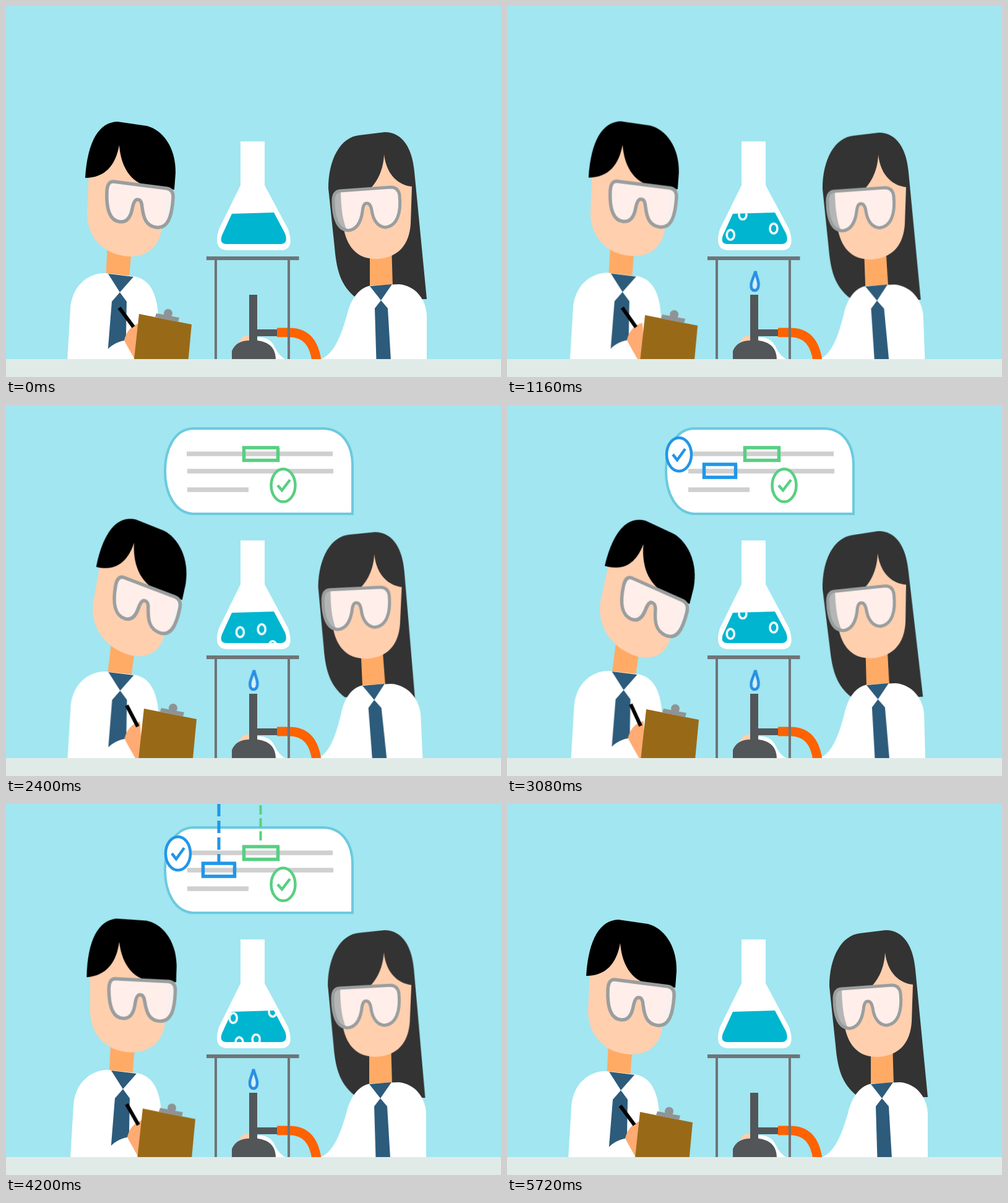
An HTML page without scripts for the animation above (5760 ms loop, 800 by 600 pixels).

```html
<!DOCTYPE html>
<html lang="en">
<head>
<meta charset="utf-8">
<title>Lab experiment</title>
<style>
html, body { margin: 0; width: 100%; height: 100%; overflow: hidden; background: #a1e6f0; }
svg { display: block; width: 800px; height: 600px; }

.loop { animation: 5.76s ease-in-out infinite; }

/* Man */
.m-head { transform-origin: 244px 225px; animation-name: m-head; }
@keyframes m-head {
  0%, 99.31%, 100% { transform: none; }
  11.11% { transform: translate(9.3px, 0) rotate(.6deg); }
  28.47% { transform: translate(1.3px, -1px) rotate(-.6deg); }
  41.67% { transform: translate(32px, -2px) rotate(10.4deg); }
  53.47% { transform: translate(50px, 0) rotate(13deg); }
  72.92% { transform: translate(0, -2px) rotate(-3.3deg); }
}
.m-neck { transform-origin: 240px 434px; animation-name: m-neck; }
@keyframes m-neck {
  0%, 99.31%, 100% { transform: none; }
  11.11% { transform: translate(4.7px, 0) rotate(1.5deg); }
  28.47% { transform: translate(2.7px, 0); }
  41.67% { transform: translate(4px, 0) rotate(5deg); }
  53.47% { transform: translate(11px, 0) rotate(6deg); }
  72.92% { transform: translate(7px, 0); }
}
.m-body { animation-name: m-body; }
@keyframes m-body {
  0%, 99.31%, 100% { transform: none; }
  11.11% { transform: translate(3.5px, 0); }
  28.47% { transform: translate(2px, -1px); }
  41.67% { transform: translate(.5px, -1px); }
  53.47% { transform: translate(4.5px, -2px); }
  72.92% { transform: translate(5px, -2px); }
}
.pen { transform-origin: 206px 519px; animation-name: pen; }
@keyframes pen {
  0%, 99.31%, 100% { transform: none; }
  11.11% { transform: translate(3px, 2px) rotate(2deg); }
  28.47% { transform: translate(2px, -1px) rotate(1deg); }
  41.67% { transform: translate(7px, 1px) rotate(9deg); }
  53.47% { transform: translate(10px, 0) rotate(12deg); }
  72.92% { transform: translate(8px, 0) rotate(7deg); }
}
.board { animation-name: board; }
@keyframes board {
  0%, 99.31%, 100% { transform: none; }
  11.11% { transform: translate(7px, 4px); }
  28.47% { transform: translate(9px, 0); }
  41.67% { transform: translate(8px, -7px); }
  53.47% { transform: translate(10px, -6px); }
  72.92% { transform: translate(6px, -5.5px); }
}

/* Woman */
.w-head { transform-origin: 816px 240px; animation-name: w-head; }
@keyframes w-head {
  0%, 99.31%, 100% { transform: none; }
  11.11% { transform: translate(-9px, 0) rotate(-.8deg); }
  28.47% { transform: translate(-19.5px, 1.5px) rotate(.9deg); }
  41.67% { transform: translate(-21px, 1.5px) rotate(1deg); }
  53.47% { transform: translate(-16px, 0) rotate(-1.4deg); }
  72.92% { transform: translate(-.5px, 0) rotate(.7deg); }
}
.w-body { transform-origin: 853px 571px; animation-name: w-body; }
@keyframes w-body {
  0%, 99.31%, 100% { transform: none; }
  11.11% { transform: translate(-2.7px, 0) skewX(1.2deg); }
  28.47% { transform: translate(-9.3px, 1px) skewX(4deg); }
  41.67% { transform: translate(-8.7px, 1px) skewX(3.5deg); }
  53.47% { transform: translate(-5.3px, 0) skewX(2deg); }
  72.92% { transform: translate(-1.3px, 0); }
}

/* Flame and bubbles */
.flame { transform-origin: 400px 463px; animation-name: flame; }
@keyframes flame {
  0%, 5.5%, 97%, 100% { transform: scale(0); }
  9%, 94.5% { transform: none; }
}
.flick { transform-origin: 400px 463px; animation: flick .48s linear infinite; }
@keyframes flick {
  0%, 100% { transform: skewX(-1.5deg); }
  33%, 75% { transform: none; }
  45% { transform: skewX(-3.5deg); }
}
.gate { animation: 5.76s step-end infinite; }
.g1 { animation-name: gate1; }
.g2 { animation-name: gate2; }
.g3 { animation-name: gate3; }
@keyframes gate1 { 0%, 95.5% { opacity: 0; } 10% { opacity: 1; } }
@keyframes gate2 { 0%, 95.5% { opacity: 0; } 13% { opacity: 1; } }
@keyframes gate3 { 0%, 95.5% { opacity: 0; } 16% { opacity: 1; } }
.rise { animation: rise .48s linear infinite; fill: none; stroke: #fff; stroke-width: 3.5; }
@keyframes rise {
  0%, 85% { opacity: 1; }
  85.1%, 100% { opacity: 0; }
  100% { transform: translate(var(--dx, 0px), -72px); }
}

/* Speech */
.speech { transform-origin: 561px 178px; animation-name: speech; animation-timing-function: linear; }
@keyframes speech {
  0%, 23.6%, 98.1%, 100% { transform: scale(0); }
  30.6%, 91.15% { transform: none; }
}
.draw { stroke-dasharray: 1 1.2; stroke-width: 5.5; animation-timing-function: linear; }
.green { fill: none; stroke: #58cf82; }
.blue { fill: none; stroke: #2196e8; }
.green.draw { animation-name: draw-g; }
.blue.draw { animation-name: draw-b; }
@keyframes draw-g {
  0%, 35.5%, 90%, 100% { stroke-dashoffset: 1.1; }
  41.7%, 85% { stroke-dashoffset: 0; }
}
@keyframes draw-b {
  0%, 45%, 90%, 100% { stroke-dashoffset: 1.1; }
  51%, 85% { stroke-dashoffset: 0; }
}
.pop-g { transform-origin: 448px 130px; animation-name: pop-g; }
.pop-b { transform-origin: 278px 80px; animation-name: pop-b; }
@keyframes pop-g {
  0%, 35%, 90%, 100% { transform: scale(0); }
  40%, 86% { transform: none; }
}
@keyframes pop-b {
  0%, 46%, 90%, 100% { transform: scale(0); }
  51%, 86% { transform: none; }
}
.reveal { transform-origin: 0 95px; animation-name: reveal; }
@keyframes reveal {
  0%, 55%, 83%, 100% { transform: scaleY(0); }
  62%, 78.5% { transform: none; }
}
</style>
</head>
<body>
<svg viewBox="0 0 800 600">
  <defs>
    <clipPath id="fluid"><path d="M365 336L433 334L451 368Q457 385 443 385H357Q344 385 349 371Z"/></clipPath>
    <clipPath id="wire"><rect class="loop reveal" width="800" height="95"/></clipPath>
    <path id="w-lens" d="M540 299L622 293Q634 293 636 306C639 335 632 356 613 358C600 357 593 345 591 330Q589 319 583 319Q577 319 576 333C573 352 566 362 553 363C535 362 529 340 529 315Q529 300 540 299Z"/>
  </defs>
  <rect width="800" height="600" fill="#a1e6f0"/>

  <!-- Speech box -->
  <g class="loop speech">
    <path d="M302 38H513C545 39 560 66 560 97V176H302C272 174 257 142 257 107C257 72 272 39 302 38Z" fill="#fff" stroke="#6ccade" stroke-width="4"/>
    <path d="M292 79H528M293 107H529M293 137H392" stroke="#cfcfcf" stroke-width="7.5"/>
  </g>
  <path class="loop draw green" pathLength="1" d="M439.5 69V89.500H384.500V69H442"/>
  <path class="loop draw blue" pathLength="1" d="M369.500 96V117H318.500V96H372"/>
  <g class="loop pop-g green" stroke-width="4.5">
    <ellipse cx="448" cy="130" rx="19.5" ry="26.5" fill="#fff"/>
    <path d="M439 130L446 138L459 121"/>
  </g>
  <g class="loop pop-b blue" stroke-width="4.5">
    <ellipse cx="278" cy="80" rx="20" ry="27" fill="#fff"/>
    <path d="M268 80L275 89L288 71"/>
  </g>
  <g clip-path="url(#wire)">
    <path class="blue" d="M344 0V94" stroke-width="5" stroke-dasharray="20 7"/>
    <path class="green" d="M411.500 2V64" stroke-width="4" stroke-dasharray="15 6"/>
  </g>

  <!-- Man -->
  <g transform="scale(.75 1)"><g class="loop m-neck"><g transform="scale(1.33333 1)">
    <path d="M164 385L203 388L199 445H161Z" fill="#ffab66"/>
  </g></g></g>
  <g class="loop m-body">
    <path d="M98 590L104 490C106 455 130 432 160 432L205 437C232 440 244 465 246 500V590Z" fill="#fff"/>
    <path d="M165 433L206 438L184 463L195 478L193 590H162L171 478L184 463Z" fill="#2d5b7b"/>
    <path d="M216 513Q194 519 190 546L206 590H222Z" fill="#ffab73"/>
    <path d="M160 590V560C168 550 179 543 191 541Q198 554 209 573V590Z" fill="#fff"/>
  </g>
  <path class="loop pen" d="M183 488L206 519" stroke="#000" stroke-width="6"/>
  <g class="loop board">
    <path d="M215 498L300 515L293 590H205Z" fill="#986a18"/>
    <circle cx="262" cy="497" r="7" fill="#8f9395"/>
    <path d="M243 497L280 504L278 511L241 503Z" fill="#8f9395"/>
  </g>
  <g transform="scale(.75 1)"><g class="loop m-head"><g transform="scale(1.33333 1)">
    <path d="M134 265L131 335C131 380 165 406 205 405C232 404 249 384 251 362L262 285L200 215H170Z" fill="#ffcfae"/>
    <path d="M128 278C132 217 151 188 180 187L228 194C252 200 275 228 274 270L272 297L238 293C205 290 186 264 183 225C177 258 160 278 128 278Z"/>
    <path d="M174 284L260 295Q271 297 270 311C268 340 262 360 243 358C226 356 222 342 220 325Q219 313 213 313Q207 312 204 328C201 343 194 350 184 349C166 347 162 325 163 300Q164 283 174 284Z" fill="#fff1ee" fill-opacity=".92" stroke="#9a9e9f" stroke-width="5.5"/>
  </g></g></g>

  <!-- Woman -->
  <g transform="scale(.75 1)">
    <g class="loop w-head"><g transform="scale(1.33333 1)">
      <path d="M521 295C521 247 541 212 571 209L612 204C642 204 657 232 660 268L680 474H600L566 472C540 452 534 425 531 390Z" fill="#333"/>
    </g></g>
    <g class="loop w-body"><g transform="scale(1.33333 1)">
      <path d="M588 385H623L625 455H588Z" fill="#ffab66"/>
      <path d="M500 590L508 572C532 562 542 530 551 500C557 475 570 454 592 452L635 450C662 452 679 475 680 500V590Z" fill="#fff"/>
      <path d="M588 453L624 450L606 476L617 489L623 590H599L596 489L606 476Z" fill="#2d5b7b"/>
    </g></g>
    <g class="loop w-head"><g transform="scale(1.33333 1)">
      <path d="M541 300L545 355C550 390 568 410 600 409C635 407 652 385 654 352L656 292C636 290 615 275 611 240C610 265 600 285 587 297Z" fill="#ffcfae"/>
      <use href="#w-lens" fill="#fff1ee" fill-opacity=".92"/>
      <path d="M541 299Q528 301 529 315C529 340 535 360 551 363Q541 340 541 299Z" fill="#b4b6b5"/>
      <use href="#w-lens" fill="none" stroke="#9a9e9f" stroke-width="5"/>
    </g></g>
  </g>

  <!-- Burner and stand -->
  <path d="M375 546Q382 530 396 533L412 538V555H375Z" fill="#ffcfae"/>
  <path d="M405 536Q427 534 435 553Q441 566 453 572H420Z" fill="#fff"/>
  <path d="M438 528H457C485 528 498 545 502 574" fill="none" stroke="#ff6200" stroke-width="15"/>
  <path d="M393 467H406V523H438V534H406V541C424 543 436 552 436 572H365V558C370 546 380 541 393 541Z" fill="#525659"/>
  <path d="M339 410V572M457 410V572" stroke="#6f7478" stroke-width="4"/>
  <path d="M324 408H473.500" stroke="#6f7478" stroke-width="6"/>
  <g class="loop flame"><g class="flick">
    <path d="M400 429C402 438 406 444 406 451C406 457 404 460 400 460C396 460 394 457 394 451C394 444 398 438 400 429Z" fill="#d3f1fa" stroke="#2a8fe3" stroke-width="4.500"/>
  </g></g>

  <!-- Flask -->
  <path d="M379 219H418V290L456 361Q467 394 445 395H357Q334 394 344 361L379 290Z" fill="#fff"/>
  <path d="M365 336L433 334L451 368Q457 385 443 385H357Q344 385 349 371Z" fill="#00b5d0"/>
  <g clip-path="url(#fluid)">
    <g class="gate g1"><ellipse class="rise" cx="355" cy="395" rx="6" ry="8" style="--dx:18px;animation-delay:-445ms"/></g>
    <g class="gate g2">
      <ellipse class="rise" cx="376" cy="396" rx="6" ry="8" style="--dx:6px;animation-delay:-190ms"/>
      <ellipse class="rise" cx="397" cy="395" rx="6" ry="8" style="--dx:36px;animation-delay:-215ms"/>
    </g>
    <g class="gate g3"><ellipse class="rise" cx="431" cy="396" rx="6" ry="8" style="animation-delay:-40ms"/></g>
  </g>

  <rect y="571" width="800" height="29" fill="#e0ebe8"/>
</svg>
</body>
</html>
```
